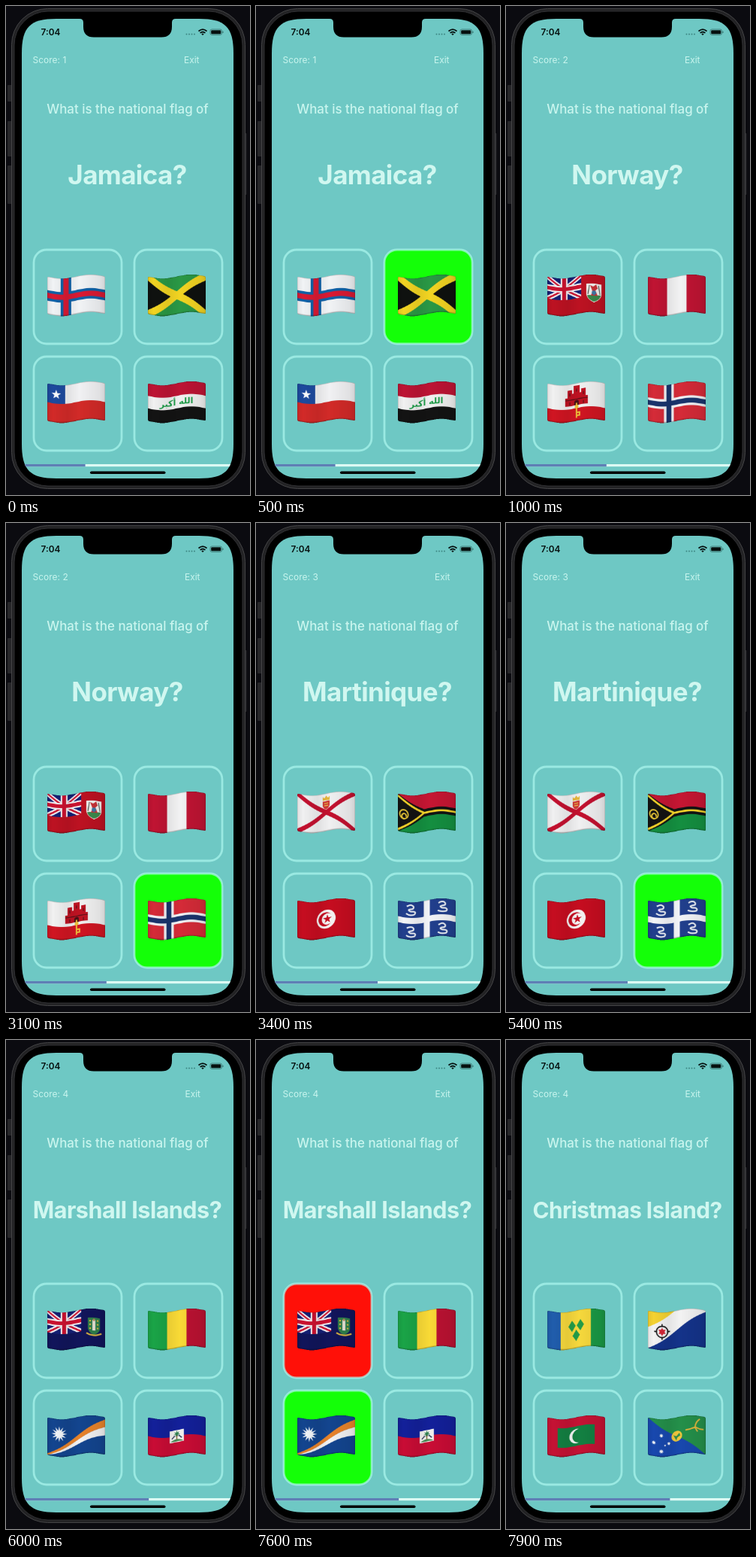
Recreate the animation shown at these times as an HTML page with a canvas. Size 325 by 650 pixels, loop 8 s.

```html
<!DOCTYPE html>
<html lang="en">
<head>
<meta charset="utf-8">
<title>Flag quiz</title>
<style>
html, body { margin: 0; width: 100%; height: 100%; overflow: hidden; background: #0b0b10; }
svg, canvas { position: absolute; left: 0; top: 0; width: 325px; height: 650px; }
text { font-family: Inter, Roboto, sans-serif; font-optical-sizing: none; fill: #c9f5ee; }
#country { font-weight: 700; fill: #d0f7f0; letter-spacing: -.018em; }
</style>
</head>
<body>
<svg viewBox="0 0 325 650">
  <clipPath id="screen">
    <path d="M21 63C21 28 32 17 67 17H257C292 17 303 28 303 63V582C303 617 292 628 257 628H67C32 628 21 617 21 582Z"/>
  </clipPath>
  <g fill="#27272a">
    <rect x="2" y="105" width="6" height="22" rx="1"/>
    <rect x="2" y="153" width="6" height="47" rx="1"/>
    <rect x="2" y="212" width="6" height="51" rx="1"/>
    <rect x="316" y="169" width="4.500" height="82" rx="1"/>
  </g>
  <rect x="7.500" y="3.500" width="311" height="638" rx="48" fill="#222224" stroke="#444446"/>
  <rect x="11" y="7" width="304" height="631" rx="45" stroke="#303033"/>
  <g clip-path="url(#screen)">
    <rect x="21" y="17" width="282" height="611" fill="#6ec8c4"/>
    <rect x="21" y="609" width="282" height="3.200" fill="#dcfaf4"/>
    <rect id="bar" x="21" y="609" height="3.200" fill="#5f7fb5"/>
    <path d="M98 17q5 0 5 5v5.500q0 14 14 14h90q14 0 14-14v-5.500q0-5 5-5z"/>
  </g>
  <rect x="112" y="618.500" width="100.500" height="3.600" rx="1.800"/>
  <text x="46.500" y="39" font-size="11.800" font-weight="600" style="fill:#06100f">7:04</text>
  <g fill="#3e8884">
    <circle cx="240.500" cy="37.500" r="1"/><circle cx="244" cy="37.500" r="1"/>
    <circle cx="247.500" cy="37.500" r="1"/><circle cx="251" cy="37.500" r="1"/>
  </g>
  <g fill="none" stroke="#06100f" stroke-width="1.700">
    <path d="M256.500 33.500q5.500-4.600 11 0M258.600 35.900q3.400-2.800 6.800 0"/>
    <path d="M262 39l-1.700-1.800q1.700-1.200 3.400 0z" fill="#06100f" stroke="none"/>
    <rect x="272" y="31" width="15.500" height="7.400" rx="2.200" stroke="#35706d" stroke-width=".8"/>
    <rect x="273.200" y="32.200" width="13.100" height="5" rx="1.200" fill="#06100f" stroke="none"/>
    <path d="M289 33.500v2.500" stroke="#35706d" stroke-width="1"/>
  </g>
  <text id="score" x="35.500" y="76" font-size="12"></text>
  <text id="exit" y="76" font-size="11.900">Exit</text>
  <text x="162" y="142.500" font-size="16.900" font-weight="450" text-anchor="middle">What is the national flag of</text>
  <text id="country" x="161.500" y="237" text-anchor="middle"></text>
</svg>
<canvas id="cards" width="325" height="650"></canvas>
<script>
const W = 77, H = 50, SCALE = 3, LOOP = 8000;
const GREEN = '#14ff08', RED = '#ff1008';
const $ = id => document.getElementById(id);
let g; // context of the flag being painted

const rect = (color, x, y, w, h) => { g.fillStyle = color; g.fillRect(x, y, w, h); };
const disc = (color, x, y, r) => { g.fillStyle = color; g.beginPath(); g.arc(x, y, r, 0, 7); g.fill(); };
const shape = (color, d) => { g.fillStyle = color; g.fill(new Path2D(d)); };
const line = (color, width, d) => { g.strokeStyle = color; g.lineWidth = width; g.stroke(new Path2D(d)); };
const rows = (...colors) => colors.forEach((c, i) => rect(c, 0, i * H / colors.length, W, H / colors.length + .1));
const cols = (...colors) => colors.forEach((c, i) => rect(c, i * W / colors.length, 0, W / colors.length + .1, H));
const cross = (color, width, x, y, w = W, h = H) => {
  rect(color, x - width / 2, 0, width, h);
  rect(color, 0, y - width / 2, w, width);
};
const saltire = (color, width, w = W, h = H) => line(color, width, `M0 0L${w} ${h}M0 ${h}L${w} 0`);
const star = (color, x, y, r, points = 5, inner = .4) => {
  g.fillStyle = color;
  g.beginPath();
  for (let i = 0; i < points * 2; i++) {
    const a = i * Math.PI / points, k = i % 2 ? r * inner : r;
    g.lineTo(x + k * Math.sin(a), y - k * Math.cos(a));
  }
  g.fill();
};
const union = (w, h) => {
  g.save();
  g.beginPath(); g.rect(0, 0, w, h); g.clip();
  rect('#141f74', 0, 0, w, h);
  saltire('#f4f0f2', 6, w, h);
  saltire('#cc1230', 2.2, w, h);
  cross('#f4f0f2', 9, w / 2, h / 2, w, h);
  cross('#cc1230', 5, w / 2, h / 2, w, h);
  g.restore();
};

const paint = {
  faroe() { rect('#f1f3f5', 0, 0, W, H); cross('#1062a8', 14, 25, 25); cross('#d91a33', 7, 25, 25); },
  jamaica() {
    rect('#2a9845', 0, 0, W, H);
    shape('#0f110f', 'M0 0L38.500 25L0 50zM77 0L38.500 25L77 50z');
    saltire('#f2d422', 9);
  },
  chile() { rows('#f1f1f3', '#d22a28'); rect('#1d4a9e', 0, 0, 24, 25); star('#fff', 12, 13, 6.500); },
  iraq() {
    rows('#bd1434', '#f1f1f1', '#131313');
    g.fillStyle = '#1a9a45';
    g.font = 'bold 11px "DejaVu Sans", sans-serif';
    g.textAlign = 'center';
    g.fillText('الله أكبر', 38.5, 29);
  },
  bermuda() {
    rect('#bd1222', 0, 0, W, H); union(45, 29);
    shape('#f3f3ef', 'M52 12H72V26Q71 33 62 37Q53 33 52 26z');
    shape('#3b8a4c', 'M53 27H71Q70 33 62 36Q54 33 53 27z');
    shape('#c83136', 'M57 14l4 2l4-3l2 5l-3 3l3 7h-9l2-6z');
    disc('#3f77a5', 62, 24, 3);
    line('#3b4740', 1, 'M56 14l-2 12M68 14l2 12');
  },
  peru() { cols('#c01433', '#f2f2f3', '#c01433'); },
  gibraltar() {
    rect('#f1f1f1', 0, 0, W, H); rect('#d01522', 0, 33, W, 17);
    shape('#be1222', 'M24 29V18h3V8h6v5h2V3h8v10h2V8h6v10h3v11z');
    line('#5a1218', 1.2, 'M30 12v4M39 7v4M48 12v4M24 21H54M30 28v-4M48 28v-4');
    shape('#4a1016', 'M36 29v-5q3-4 6 0v5z');
    line('#edc23a', 1.8, 'M39 26V46M39 43h4v-4h-4');
    disc('#edc23a', 39, 31, 2.6);
  },
  norway() { rect('#d52b38', 0, 0, W, H); cross('#f3f3f6', 13, 28, 25); cross('#1a346d', 6.500, 28, 25); },
  jersey() {
    rect('#f0f0f1', 0, 0, W, H); saltire('#c3102f', 5.500);
    shape('#cf3a35', 'M34 10h9v6q-1 4-4.500 5q-3.500-1-4.500-5z');
    shape('#e4b53b', 'M34 9V4l2 2l2.500-3l2.500 3l2-2v5z');
    line('#e9c04a', 1.2, 'M36 13h5M36 16h5');
  },
  vanuatu() {
    rows('#c61633', '#148f40');
    shape('#131313', 'M0 0L35 20H77V30H35L0 50z');
    line('#f4d42a', 2.6, 'M0 2.500L35 25H77M0 47.500L35 25');
    line('#e8c737', 1.700, 'M9 32a5.500 6 0 1 1 4-3q-3 4-7 2q-2-4 2-6q4 0 3 4');
  },
  tunisia() {
    rect('#c60d20', 0, 0, W, H);
    disc('#f6f3f3', 38.5, 25, 12.5); disc('#c60d20', 37.5, 25, 9.2); disc('#f6f3f3', 40, 25, 7.4);
    star('#c60d20', 40, 25, 6);
  },
  martinique() {
    rect('#213f8d', 0, 0, W, H); cross('#f3f5f8', 8, 38.5, 25);
    for (const x of [17, 59]) for (const y of [11, 40])
      line('#edf1f6', 2, `M${x - 5} ${y - 5}q6-4 9 0q1 3-4 3.500q-5 1 0 3h4q4 1 1 4q-6 2-11-1`);
  },
  virgin() {
    rect('#11155b', 0, 0, W, H); union(45, 29);
    shape('#2f7f4b', 'M54 12H70V26Q69 32 62 35Q55 32 54 26z');
    shape('#e9e4d6', 'M60 15h4v14h-4z');
    disc('#b98b62', 62, 15, 1.6);
    g.fillStyle = '#e5b93b';
    for (const x of [56, 66]) for (const y of [15, 20, 25]) g.fillRect(x, y, 2, 2);
    line('#d9b341', 2, 'M52 32q10 7 20 0');
  },
  mali() { cols('#1aa447', '#f9da36', '#bb1232'); },
  marshall() {
    rect('#13458f', 0, 0, W, H);
    shape('#e8832a', 'M0 48L77 3V13L0 50z');
    shape('#f3f3f3', 'M0 50L77 13V24z');
    star('#f5f7fa', 16, 20, 10.5, 12, .45);
  },
  haiti() {
    rows('#13209a', '#c90c35');
    rect('#f1f1ee', 29, 17, 19, 16);
    line('#8a6b41', 1.200, 'M38.500 21v9');
    star('#2f8050', 38.5, 22, 4.5, 7, .4);
    shape('#4b8a55', 'M30 32q8-6 17 0z');
    line('#34405f', 1.5, 'M32 28l4-4M45 28l-4-4');
  },
  vincent() {
    rect('#f6d83c', 0, 0, W, H); rect('#205dac', 0, 0, 18, H); rect('#1a9945', 58, 0, 19, H);
    for (const [x, y] of [[33, 20], [44, 20], [38.5, 33]])
      shape('#229c48', `M${x} ${y - 7.5}l4.800 7.500l-4.800 7.500l-4.800-7.500z`);
  },
  bonaire() {
    rect('#f3f3f3', 0, 0, W, H);
    shape('#f4d232', 'M0 0H36L0 22z');
    shape('#14338a', 'M77 2V50H0z');
    line('#181818', 1.600, 'M11.500 26a7.500 7.500 0 1 0 15 0a7.500 7.500 0 1 0-15 0M19 15.500v4M19 32.500v4M8.500 26h4M25.500 26h4');
    star('#d22736', 19, 26, 5.5, 6, .58);
  },
  maldives() {
    rect('#c51234', 0, 0, W, H); rect('#138042', 14, 12, 49, 26);
    disc('#f4f4f4', 39, 25, 9.5); disc('#138042', 42.5, 25, 9);
  },
  christmas() {
    rect('#24904a', 0, 0, W, H);
    shape('#1848ae', 'M0 0L77 50H0z');
    disc('#f0c63c', 38.5, 25, 7);
    shape('#2d8c4c', 'M34 23l4 2l4-4l1 4l-4 2l-1 4l-2-4z');
    line('#e3b83c', 1.800, 'M50 19q9-1 13-4q0-6 6-11M63 15q5 3 11 2M62 15l4 6');
    for (const [x, y, r] of [[18, 22, 3], [8, 32, 3], [28, 33, 2.5], [18, 43, 3.2], [23, 35, 1.5]])
      star('#f3f5f8', x, y, r, 7, .5);
  }
};

// Flat flag, shaded, then bent column by column into a wave.
const cache = {};
function flag(name) {
  if (cache[name]) return cache[name];
  const flat = document.createElement('canvas'), out = document.createElement('canvas');
  flat.width = out.width = W * SCALE;
  flat.height = H * SCALE;
  out.height = (H + 6) * SCALE;
  g = flat.getContext('2d');
  g.scale(SCALE, SCALE);
  g.beginPath(); g.roundRect(0, 0, W, H, 2); g.clip();
  g.save(); paint[name](); g.restore();
  const light = g.createLinearGradient(0, 0, W, 0);
  [[0, '#0001'], [.1, '#0000'], [.35, '#0001'], [.55, '#0000'], [.9, '#0001'], [1, '#0002']]
    .forEach(s => light.addColorStop(...s));
  rect(light, 0, 0, W, H);
  g.strokeStyle = '#0003';
  g.lineWidth = 1.4;
  g.beginPath(); g.roundRect(0, 0, W, H, 2); g.stroke();
  rect('#0002', 0, H - 1.5, W, 1.5);
  const o = out.getContext('2d');
  for (let x = 0; x < flat.width; x++) {
    const y = 3 + 2.6 * Math.sin(2 * Math.PI * x / flat.width);
    o.drawImage(flat, x, 0, 1, flat.height, x, y * SCALE, 1, flat.height);
  }
  return cache[name] = out;
}

const rounds = [
  { from: 0, name: 'Jamaica?', size: 35, score: 1, exit: 237, flags: 'faroe jamaica chile iraq', answered: 400, marks: { 1: GREEN } },
  { from: 700, name: 'Norway?', size: 35, score: 2, exit: 238, flags: 'bermuda peru gibraltar norway', answered: 3100, marks: { 3: GREEN } },
  { from: 3400, name: 'Martinique?', size: 35, score: 3, exit: 238, flags: 'jersey vanuatu tunisia martinique', answered: 5400, marks: { 3: GREEN } },
  { from: 5700, name: 'Marshall Islands?', size: 30.6, score: 4, exit: 238.5, flags: 'virgin mali marshall haiti', answered: 7600, marks: { 0: RED, 2: GREEN } },
  { from: 7900, name: 'Christmas Island?', size: 29.8, score: 4, exit: 238.5, flags: 'vincent bonaire maldives christmas', answered: LOOP, marks: {} }
];
const c = $('cards').getContext('2d');
c.imageSmoothingQuality = 'high';

function draw(t) {
  const n = rounds.findLastIndex(r => t >= r.from), r = rounds[n];
  $('score').textContent = 'Score: ' + r.score;
  $('exit').setAttribute('x', r.exit);
  $('country').textContent = r.name;
  $('country').setAttribute('font-size', r.size);
  $('bar').setAttribute('width', 28.2 * (n + 3));
  c.clearRect(0, 0, 325, 650);
  r.flags.split(' ').forEach((name, i) => {
    const x = 36 + i % 2 * 134, y = 323 + (i >> 1) * 142;
    c.beginPath();
    c.roundRect(x + 1, y + 1, 117, 125, 17);
    if (t >= r.answered && r.marks[i]) { c.fillStyle = r.marks[i]; c.fill(); }
    c.strokeStyle = 'rgb(176 249 241 / .67)';
    c.lineWidth = 2.8;
    c.stroke();
    c.drawImage(flag(name), x + 19, y + 33.5, W, H + 6);
  });
}

const start = performance.now();
(function tick() {
  draw((performance.now() - start) % LOOP);
  requestAnimationFrame(tick);
})();
</script>
</body>
</html>
```
